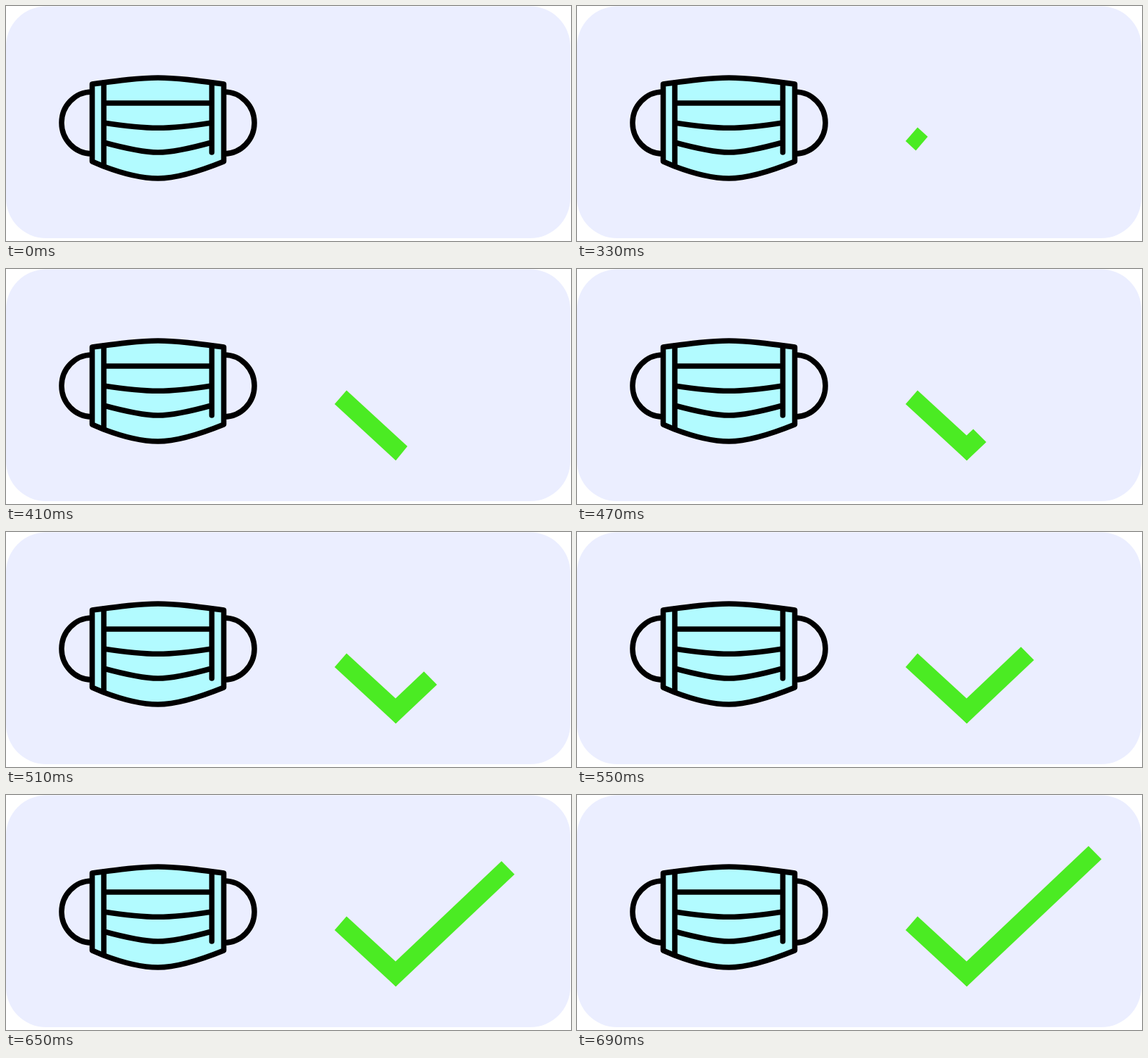
Animation of 803 by 334 pixels, one loop 1020 ms. Source, as an HTML page with a canvas:

```html
<!DOCTYPE html>
<html lang="en">
<head>
<meta charset="utf-8">
<title>Mask check</title>
<style>
  html, body { margin: 0; width: 100%; height: 100%; overflow: hidden; background: #fff; }
  canvas { display: block; }
</style>
</head>
<body>
<canvas id="stage" width="803" height="334"></canvas>
<script>
const ctx = document.getElementById('stage').getContext('2d');
const LOOP = 1020, START = 330, STEP = 20, LAST = 18, TURN = 4;

// Long arm: [step, horizontal reach, speed per step]
const REACH = [[4, 0, 5], [9, 58.5, 17.5], [11, 95.5, 18], [14, 142.5, 14], [18, 191.5, 10.5]];

const body = new Path2D('M122.5 111 C160 106 190 102 216 102 C242 102 272 106 309.5 111 V221 C270 237 238 245 216 245 C194 245 168 239 139 228 L122.5 221 Z');
const lines = new Path2D(
  'M122 122 C98 122 79 142 79 166 S98 210 122 210' +
  'M310 122 C334 122 353 142 353 166 S334 210 310 210' +
  'M139 109 V227 M292.5 109 V208 M139 138 H292' +
  'M139 166 C172 171 198 173.3 216 173.3 S260 171 292 166' +
  'M139 194 C176 204 200 208 216 208 S256 204 292 194');

function reachAt(k) {
  let i = 0;
  while (i < REACH.length - 2 && k > REACH[i + 1][0]) i++;
  const [k0, x0, v0] = REACH[i], [k1, x1, v1] = REACH[i + 1];
  const d = k1 - k0, u = (k - k0) / d, w = 1 - u;
  return x0 * w * w * (1 + 2 * u) + x1 * u * u * (3 - 2 * u) + d * u * w * (v0 * w - v1 * u);
}

function polygon(points) {
  ctx.beginPath();
  for (const [x, y] of points) ctx.lineTo(x, y);
  ctx.closePath();
  ctx.fill();
}

function drawCard() {
  ctx.fillStyle = '#fff';
  ctx.fillRect(0, 0, 803, 334);
  ctx.fillStyle = '#ebeeff';
  ctx.beginPath();
  ctx.roundRect(0, 0.5, 802, 329.5, 57);
  ctx.fill();
}

function drawMask() {
  ctx.fillStyle = '#b2fbff';
  ctx.fill(body);
  ctx.strokeStyle = '#000';
  ctx.lineWidth = 7.6;
  ctx.lineCap = ctx.lineJoin = 'round';
  ctx.stroke(lines);
  ctx.stroke(body);
}

function drawCheck(k) {
  ctx.fillStyle = '#4beb23';
  const a = (14.5 + 18 * Math.min(k, TURN)) / 86.5;
  polygon([[484, 172.5], [484 + 86.5 * a, 172.5 + 79.5 * a], [467 + 87 * a, 192 + 80.3 * a], [467, 192]]);
  if (k <= TURN) return;
  const x = reachAt(k), y = -x * 0.946;
  polygon([[554, 272.3], [535.5, 253.7], [535.5 + x, 253.7 + y], [554 + x, 272.3 + y]]);
}

function frame(now) {
  const t = now % LOOP;
  drawCard();
  drawMask();
  if (t >= START) drawCheck(Math.min(LAST, Math.floor((t - START) / STEP)));
  requestAnimationFrame(frame);
}
requestAnimationFrame(frame);
</script>
</body>
</html>
```
